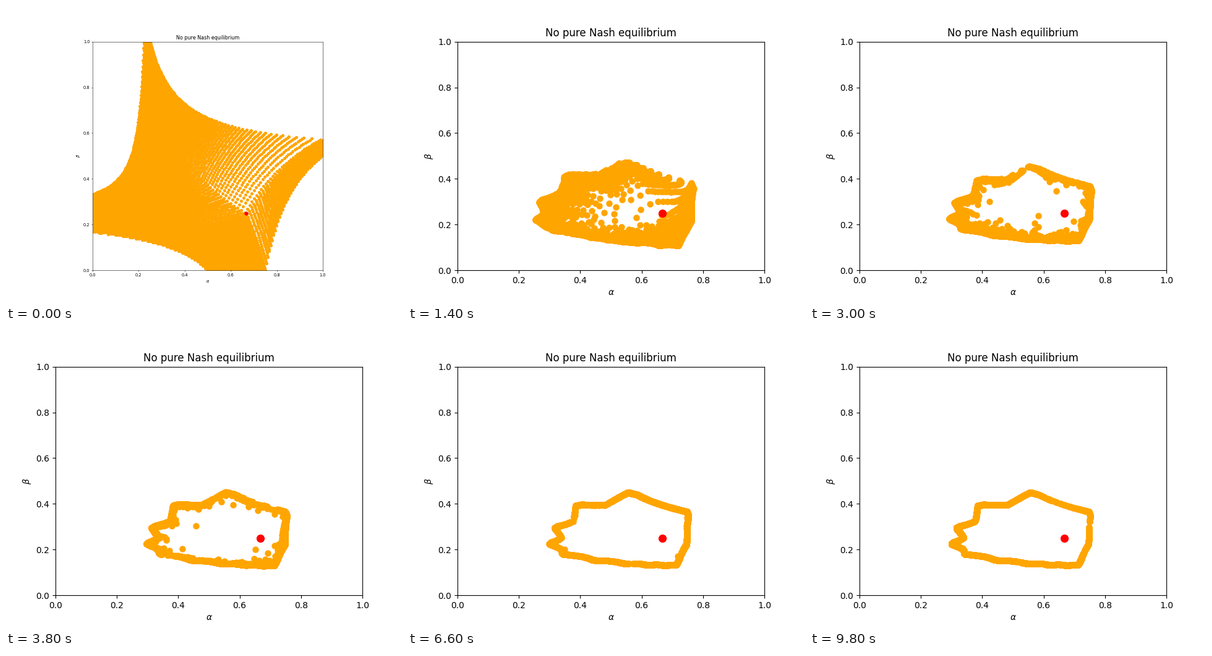
Recreate the animation shown at these times as a matplotlib script. Size 640x480 px, loop 10000 ms.

```python
import numpy as np
import matplotlib.pyplot as plt
from matplotlib.animation import FuncAnimation

FRAMES, INTERVAL = 50, 200
GRID = 100
EQUILIBRIUM = (2 / 3, 1 / 4)


def improve(p, gain):
    """Shift probability p towards the better reply, in proportion to its regret."""
    up = np.maximum(0, (1 - p) * gain)
    down = np.maximum(0, -p * gain)
    return (p + up) / (1 + up + down)


def step(a, b):
    return improve(a, 1 - 4 * b), improve(b, 3 * a - 2)


def orbit():
    a, b = (g.ravel() for g in np.meshgrid(*[np.linspace(0, 1, GRID)] * 2))
    states = []
    for _ in range(FRAMES):
        a, b = step(a, b)
        states.append(np.column_stack([a, b]))
    return states


def panel(fig, left, width, k):
    """Axes with every text, line and marker scaled by k."""
    ax = fig.add_axes([left, 0.11, width, 0.77])
    ax.set(xlim=(0, 1), ylim=(0, 1))
    ax.set_title("No pure Nash equilibrium", fontsize=12 * k, pad=6 * k)
    ax.set_xlabel(r"$\alpha$", fontsize=10 * k, labelpad=4 * k)
    ax.set_ylabel(r"$\beta$", fontsize=10 * k, labelpad=4 * k)
    ax.tick_params(labelsize=10 * k, length=3.5 * k, width=0.8 * k, pad=3.5 * k)
    for spine in ax.spines.values():
        spine.set_linewidth(0.8 * k)
    dots = ax.scatter([], [], s=36 * k**2, linewidths=1.5 * k, color="orange")
    ax.scatter(*EQUILIBRIUM, s=64 * k**2, linewidths=1.5 * k, color="red")
    return ax, dots


fig = plt.figure(figsize=(6.4, 4.8), dpi=100, facecolor="white")
small = panel(fig, 140 / 640, 372 / 640, 0.48)
large = panel(fig, 0.125, 0.775, 1)
states = orbit()


def draw(i):
    first = i == 0
    small[0].set_visible(first)
    large[0].set_visible(not first)
    dots = small[1] if first else large[1]
    dots.set_offsets(states[i])
    return [dots]


anim = FuncAnimation(fig, draw, frames=FRAMES, interval=INTERVAL,
                     repeat=True, repeat_delay=0, blit=False)
plt.show()
```
